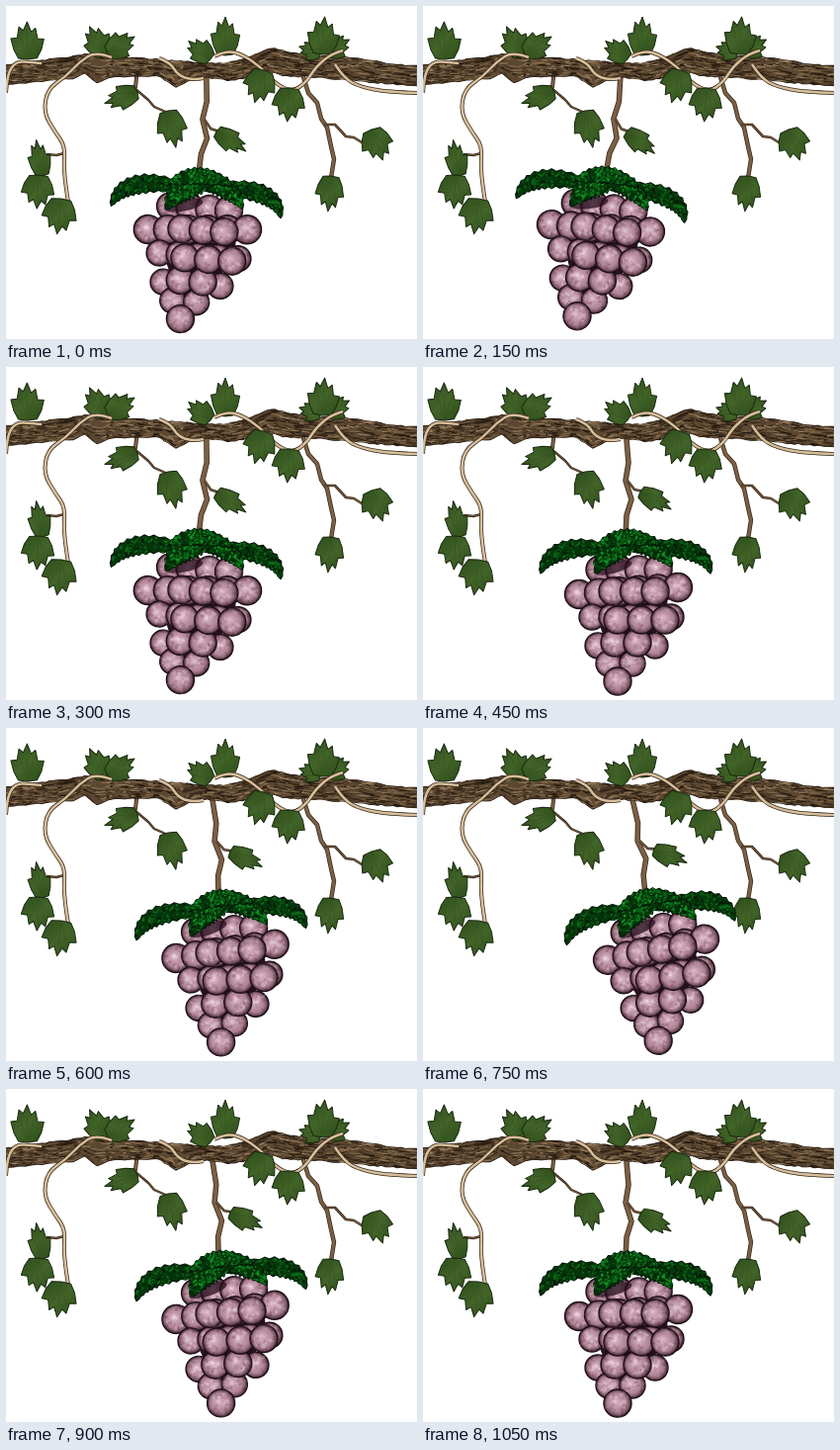
An HTML page with a canvas for the animation above (1200 ms loop, 416x337 px).

```html
<!DOCTYPE html>
<html lang="en">
<head>
<meta charset="utf-8">
<title>Swinging grapes</title>
<style>
html, body { margin: 0; width: 100%; height: 100%; overflow: hidden; background: #fff; }
canvas { display: block; }
</style>
</head>
<body>
<canvas id="stage" width="416" height="337"></canvas>
<script>
const ctx = document.getElementById('stage').getContext('2d');
const STEP_MS = 150, STEPS = 8;
const ANGLE = 4.1 * Math.PI / 180;
const PIVOT = { x: 206, y: 30 };
const OUTLINE = '#3a2818', TENDRIL = '#d6bf9c', TWIG = '#7a6045';

function random(seed) {
  return () => {
    seed = (seed * 1664525 + 1013904223) >>> 0;
    return seed / 4294967296;
  };
}

const pick = (list, rnd) => list[Math.floor(rnd() * list.length)];

// Linear peak of height h around c, w wide on each side
const tent = (x, c, w, h) => h * Math.max(0, 1 - Math.abs(x - c) / w);

function polygon(points) {
  ctx.beginPath();
  for (const [x, y] of points) ctx.lineTo(x, y);
  ctx.closePath();
}

function outline(color, width = 1) {
  ctx.lineWidth = width;
  ctx.strokeStyle = color;
  ctx.stroke();
}

function spot(x, y, rx, ry, color, turn = 0) {
  ctx.fillStyle = color;
  ctx.beginPath();
  ctx.ellipse(x, y, rx, ry, turn, 0, Math.PI * 2);
  ctx.fill();
}

function rope(width, color) {
  ctx.lineJoin = 'round';
  outline(OUTLINE, width);
  outline(color, width - 1.5);
}

function twig(width, ...points) {
  ctx.beginPath();
  for (const [x, y] of points) ctx.lineTo(x, y);
  rope(width, TWIG);
}

// Smooth line that starts and ends on its points and rounds the others
function tendril(...points) {
  const end = points.pop();
  ctx.beginPath();
  ctx.moveTo(...points[0]);
  for (let i = 1; i < points.length; i++) {
    const [x, y] = points[i], next = points[i + 1];
    if (next) ctx.quadraticCurveTo(x, y, (x + next[0]) / 2, (y + next[1]) / 2);
    else ctx.quadraticCurveTo(x, y, ...end);
  }
  rope(4, TENDRIL);
}

function leaf(x, y, length, degrees, ratio = .98) {
  const width = length * ratio;
  const side = [[.28, .03], [.42, .27], [.5, .56], [.31, .58], [.25, .87], [.12, .77]];
  const right = side.map(([a, b]) => [a * width, b * length]);
  const left = side.map(([a, b]) => [-a * width, b * length * .95]).reverse();
  ctx.save();
  ctx.translate(x, y);
  ctx.rotate((degrees - 90) * Math.PI / 180);
  polygon([[0, 0], ...right, [0, length], ...left]);
  const shade = ctx.createLinearGradient(-width / 2, 0, width / 2, length);
  shade.addColorStop(0, '#2d4b1a');
  shade.addColorStop(.5, '#426428');
  shade.addColorStop(1, '#2f4d1c');
  ctx.fillStyle = shade;
  ctx.fill();
  outline('#182a0e');
  ctx.beginPath();
  for (const spread of [-.25, 0, .25]) {
    ctx.moveTo(0, 1);
    ctx.lineTo(spread * width, length * .7);
  }
  outline('#345420', .6);
  ctx.restore();
}

const barkTop = x => 59 - tent(x, 80, 80, 10) - tent(x, 155, 90, 5)
  - tent(x, 268, 46, 16) - tent(x, 330, 70, 10);
const barkBottom = x => 72 + tent(x, 0, 90, 8) - tent(x, 80, 12, 5) + tent(x, 93, 14, 7)
  + tent(x, 173, 18, 11) + tent(x, 225, 30, 4) - tent(x, 263, 22, 6) + tent(x, 416, 110, 10);

function bark() {
  const rnd = random(17), top = [], bottom = [];
  for (let x = -4; x <= 420; x += 4) {
    top.push([x, barkTop(x) + rnd() * 1.4]);
    bottom.unshift([x, barkBottom(x) - rnd() * 1.4]);
  }
  polygon([...top, ...bottom]);
  ctx.fillStyle = '#5c4832';
  ctx.fill();
  outline('#2c1f14');
  ctx.save();
  ctx.clip();
  // Grain follows the two edges
  const grain = (x, depth) => barkTop(x) + (barkBottom(x) - barkTop(x)) * depth;
  for (let i = 0; i < 900; i++) {
    const x = rnd() * 430 - 10, depth = rnd(), length = 3 + rnd() * 9;
    ctx.beginPath();
    ctx.moveTo(x, grain(x, depth));
    ctx.lineTo(x + length, grain(x + length, depth) + rnd() * 3 - 1.5);
    outline(pick(['#20160d', '#3a2a1b', '#84694b', '#9a7f5d', '#2d2014'], rnd), .6 + rnd() * .7);
  }
  ctx.restore();
}

function grape(x, y, r) {
  const rnd = random(Math.round(x * 31 + y * 7));
  ctx.save();
  ctx.beginPath();
  ctx.arc(x, y, r, 0, Math.PI * 2);
  ctx.fillStyle = '#bb91a2';
  ctx.fill();
  outline('#1c0d14', 1.4);
  ctx.clip();
  for (let i = 0; i < 26; i++) {
    const a = rnd() * 6.3, d = Math.sqrt(rnd()) * r;
    const color = i % 2 ? 'rgba(235,205,218,.55)' : 'rgba(126,78,101,.4)';
    spot(x + Math.cos(a) * d, y + Math.sin(a) * d, .8 + rnd() * 2.4, .8 + rnd() * 1.6, color, a);
  }
  const shade = ctx.createRadialGradient(x - r * .2, y - r * .15, 0, x, y, r);
  shade.addColorStop(0, 'rgba(255,238,245,.6)');
  shade.addColorStop(.35, 'rgba(222,186,202,.25)');
  shade.addColorStop(.65, 'rgba(120,76,96,.15)');
  shade.addColorStop(.87, 'rgba(70,38,52,.6)');
  shade.addColorStop(1, 'rgba(30,14,21,.95)');
  ctx.fillStyle = shade;
  ctx.fillRect(x - r, y - r, r * 2, r * 2);
  ctx.restore();
}

function row(x, y, count, gap, r = 14, rise = 0) {
  for (let i = 0; i < count; i++) grape(x + i * gap, y - i * rise, r);
}

// Serrated leaf along a curve from start over bend to tip
function capLeaf(start, bend, tip, width, tones) {
  const rnd = random(tip[0]), upper = [], lower = [], spine = [];
  const n = 22;
  for (let i = 0; i <= n; i++) {
    const t = i / n, s = 1 - t;
    const at = k => s * s * start[k] + 2 * s * t * bend[k] + t * t * tip[k];
    const slope = k => s * (bend[k] - start[k]) + t * (tip[k] - bend[k]);
    const long = Math.hypot(slope(0), slope(1));
    const nx = -slope(1) / long, ny = slope(0) / long;
    const half = width * Math.sin(Math.PI * t ** .9) ** .7 * (i % 2 ? 1 : .78) || 0;
    const x = at(0), y = at(1);
    upper.push([x + nx * half, y + ny * half]);
    lower.unshift([x - nx * half, y - ny * half]);
    spine.push([x, y]);
  }
  polygon([...upper, ...lower]);
  ctx.fillStyle = '#05340b';
  ctx.fill();
  outline('#021505', 1.2);
  ctx.save();
  ctx.clip();
  for (let i = 0; i < 240; i++) {
    const [x, y] = pick(spine, rnd);
    spot(x + (rnd() - .5) * width * 2, y + (rnd() - .5) * width * 2,
      .6 + rnd() * 2, .5 + rnd(), pick(tones, rnd), rnd() * 3);
  }
  ctx.restore();
}

function cap() {
  const dark = ['#021a05', '#0a5a14', '#063a0c', '#0b6c18'];
  const bright = ['#032407', '#0d7a1b', '#129024', '#074a0f', '#0c6818'];
  capLeaf([200, 186], [128, 174], [119, 209], 10, dark);
  capLeaf([210, 186], [286, 174], [291, 209], 10, dark);
  capLeaf([195, 176], [236, 174], [252, 202], 11, bright);
  capLeaf([228, 174], [187, 176], [175, 209], 14, bright);
  capLeaf([176, 182], [206, 164], [240, 180], 9, bright);
}

function stem() {
  twig(5.5, [205, 62], [208, 97], [205, 115], [211, 134], [206, 150], [205, 172]);
  twig(2.6, [207, 115], [214, 124], [223, 126]);
  leaf(220, 126, 36, 30, .62);
}

function bunch() {
  polygon([[172, 198], [246, 198], [248, 255], [198, 310], [170, 240]]);
  ctx.fillStyle = '#2b131d';
  ctx.fill();
  row(179, 205, 4, 19.7);
  row(158, 230, 6, 20, 14.5, 1.4);
  row(171, 253, 5, 20, 13);
  row(177, 282, 2, 58, 13);
  row(188, 300, 2, 24, 13);
  row(197, 318, 1, 0);
  row(194, 279, 2, 23);
  row(197, 256, 3, 24);
  row(192, 227, 3, 21.5);
  spot(192, 203, 20, 6, 'rgba(38,12,28,.75)', -.25);
  cap();
}

function sideTwigs() {
  twig(4.4, [298, 62], [306, 88], [315, 98], [319, 114], [325, 123], [329, 142], [332, 155], [329, 174]);
  twig(2.6, [322, 120], [333, 120], [344, 132], [352, 133], [360, 138], [368, 134]);
  twig(4, [133, 64], [131, 82], [124, 88]);
  twig(2.4, [131, 84], [144, 95], [150, 102], [166, 109]);
}

function topLeaves() {
  leaf(22, 54, 38, -91, .88);
  leaf(100, 50, 33, -118, .85);
  leaf(103, 48, 32, -32, .85);
  leaf(207, 54, 29, -140, .85);
  leaf(222, 50, 39, -90, .75);
  leaf(319, 47, 23, -165);
  leaf(325, 47, 26, -30);
  leaf(320, 49, 38, -86, .85);
}

function tendrils() {
  tendril([0, 88], [1, 70], [9, 57], [22, 56], [36, 58]);
  twig(2.4, [59, 149], [51, 151], [41, 150]);
  tendril([107, 52], [91, 46], [75, 56], [61, 71], [42, 84], [38, 108], [50, 128], [60, 142], [58, 168], [63, 198]);
  tendril([155, 53], [166, 57], [174, 70], [188, 75], [200, 73]);
  tendril([211, 51], [223, 45], [239, 49], [257, 61], [273, 79], [290, 87], [304, 77], [314, 61], [330, 48], [341, 45]);
  tendril([333, 59], [342, 73], [359, 82], [386, 87], [416, 88]);
}

function hangingLeaves() {
  leaf(37, 172, 37, -100, .62);
  leaf(33, 171, 34, 93);
  leaf(56, 195, 36, 97);
  leaf(133, 87, 35, 161, .7);
  leaf(164, 106, 38, 78, .8);
  leaf(261, 65, 34, 106);
  leaf(287, 83, 34, 94);
  leaf(329, 172, 36, 95, .8);
  leaf(370, 125, 33, 70);
}

function swing(turn, draw) {
  ctx.save();
  ctx.translate(PIVOT.x, PIVOT.y);
  ctx.rotate(turn);
  ctx.translate(-PIVOT.x, -PIVOT.y);
  draw();
  ctx.restore();
}

function scene(turn) {
  ctx.fillStyle = '#fff';
  ctx.fillRect(0, 0, 416, 337);
  swing(turn, stem);
  sideTwigs();
  bark();
  topLeaves();
  tendrils();
  hangingLeaves();
  swing(turn, bunch);
}

// Triangle wave: 1, 2, 1, 0, -1, -2, -1, 0
const pose = step => 2 - Math.abs((step + 3) % STEPS - 4);

const start = performance.now();
let shown = -1;
function tick() {
  const step = Math.floor((performance.now() - start) / STEP_MS) % STEPS;
  if (step !== shown) {
    shown = step;
    scene(pose(step) * ANGLE);
  }
  requestAnimationFrame(tick);
}
tick();
</script>
</body>
</html>
```
